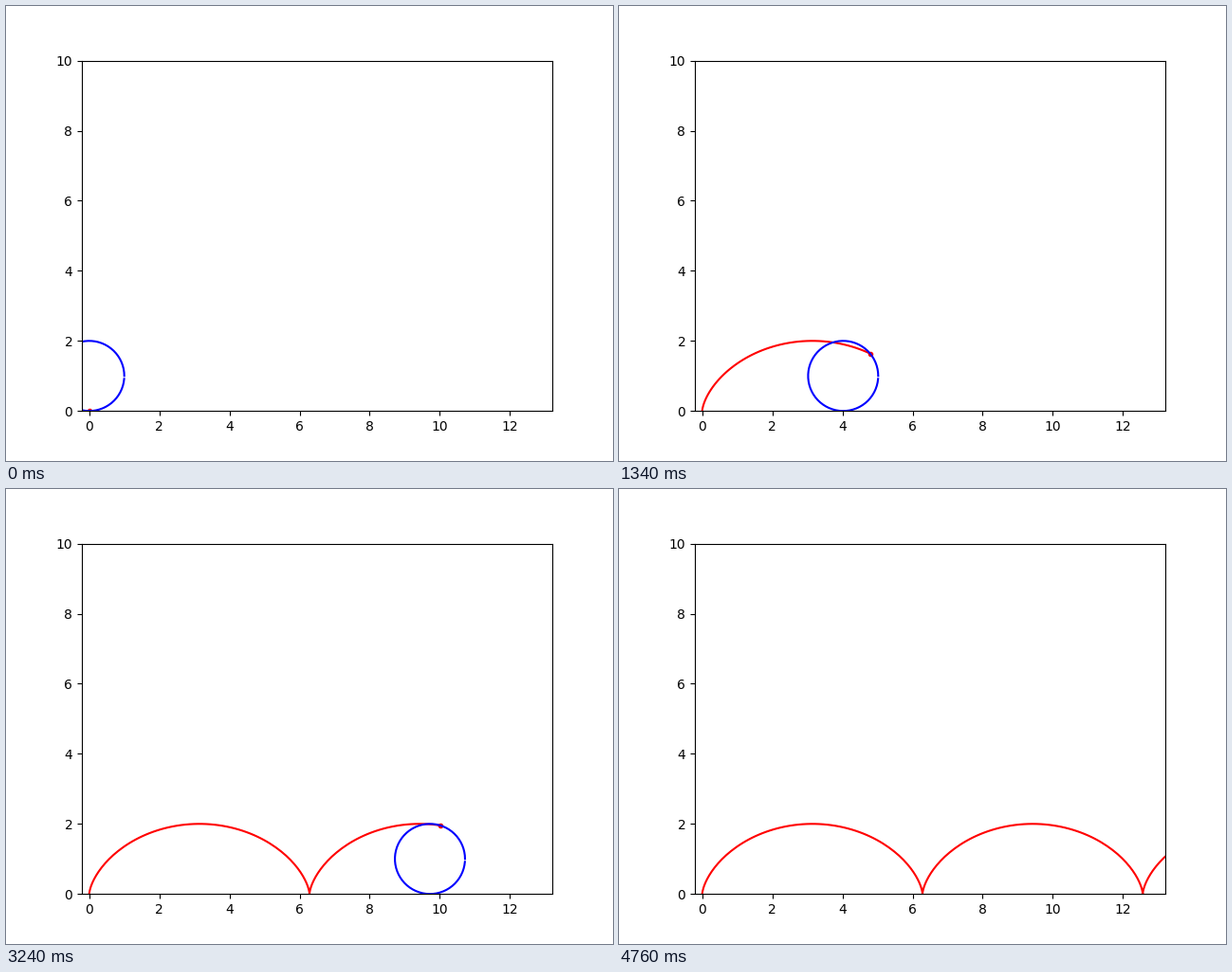
Recreate the animation shown at these times as a matplotlib script. Size 640x480 px, loop 5.22 s.

```python
import numpy as np
import matplotlib.pyplot as plt
from matplotlib.animation import FuncAnimation

FRAMES = 261
STEP = 0.06  # rolling angle per frame, radius 1

fig, ax = plt.subplots(figsize=(6.4, 4.8), dpi=100)

# Equal scale on both axes, centred on x = 6.5
half_width = 5 * (0.775 * 6.4) / (0.77 * 4.8)
ax.set_xlim(6.5 - half_width, 6.5 + half_width)
ax.set_ylim(0, 10)

trail, = ax.plot([], [], "r-", lw=1.5)
dot, = ax.plot([], [], "r.", ms=6)
wheel, = ax.plot([], [], "b-", lw=1.5)

# The open end of this range leaves a small gap in the wheel
rim = np.arange(0, 2 * np.pi, 0.1)


def cycloid(t):
    return t - np.sin(t), 1 - np.cos(t)


def update(frame):
    t = STEP * np.arange(frame + 1)
    x, y = cycloid(t)
    trail.set_data(x, y)
    dot.set_data(x[-1:], y[-1:])
    wheel.set_data(t[-1] + np.cos(rim), 1 + np.sin(rim))
    return trail, dot, wheel


def reset():
    return update(0)


anim = FuncAnimation(fig, update, frames=FRAMES, init_func=reset,
                     interval=20, repeat=True, repeat_delay=0, blit=False)

plt.show()
```
